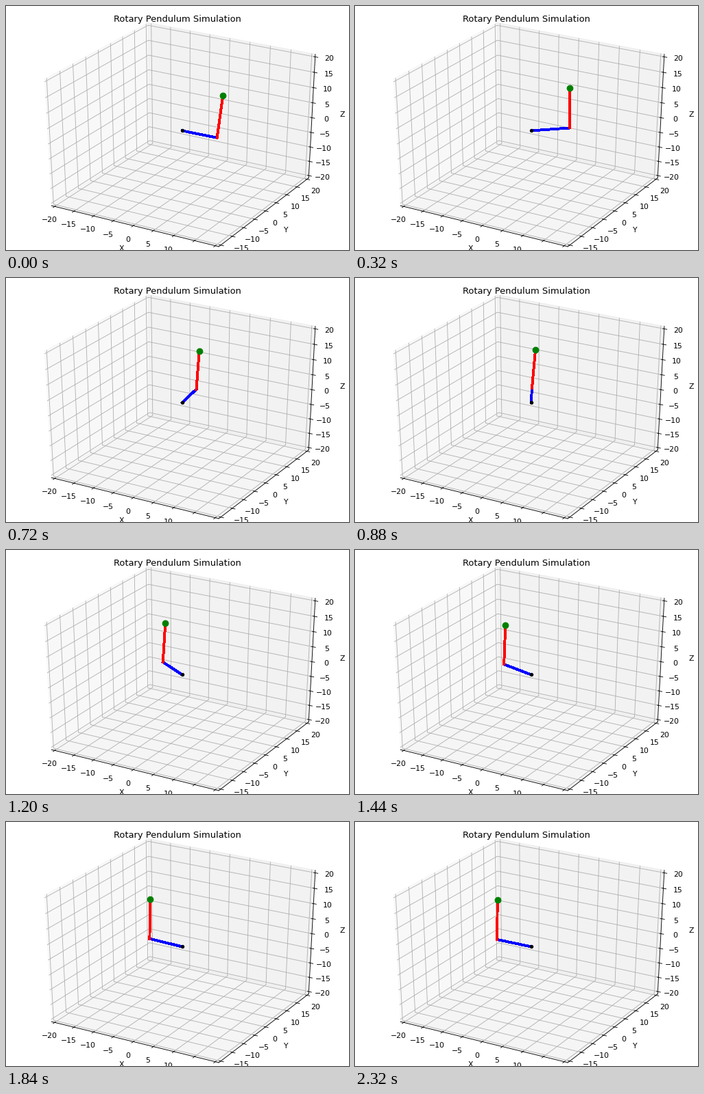
Write a matplotlib script that moves like this. It is 500 px wide and 357 px high and loops after 2440 ms.

```python
import math

import matplotlib.pyplot as plt
import numpy as np
from matplotlib.animation import FuncAnimation

DPI = 78.125
WIDTH, HEIGHT = 500, 357
AXES_HEIGHT = 375          # the axes run past the bottom edge of the stage
FRAMES, INTERVAL = 61, 40
ARM, ROD = 8.5, 12.8
LIMIT = 20


def arm_angle(t):
    """Half turn in degrees that gathers speed, then settles."""
    return 181.5 - 180 * math.exp(-0.52 * t - 0.77 * t * t)


def rod_lean(t):
    """Damped swing of the rod, in radians, about a slight offset."""
    return 0.223 * math.exp(-2 * t) * math.cos(2.6 * t) - 0.033


def pose(t):
    """Positions of the arm tip and the bob."""
    theta, lean = math.radians(arm_angle(t)), rod_lean(t)
    radial = np.array([math.cos(theta), math.sin(theta), 0])
    tangent = np.array([-math.sin(theta), math.cos(theta), 0])
    up = np.array([0, 0, 1])
    tip = ARM * radial
    return tip, tip + ROD * (math.sin(lean) * tangent + math.cos(lean) * up)


def set_points(line, *points):
    line.set_data_3d(*np.array(points).T)


fig = plt.figure(figsize=(WIDTH / DPI, HEIGHT / DPI), dpi=DPI, facecolor="white")
ax = fig.add_axes([0, 1 - AXES_HEIGHT / HEIGHT, 1, AXES_HEIGHT / HEIGHT],
                  projection="3d")
ax.apply_aspect = lambda position=None: None   # fill the rectangle, not a square
ax.set_box_aspect((1, 1, 1), zoom=math.sqrt(3) / 1.8294640721620434)
ax.view_init(elev=30, azim=-60)

edge = LIMIT * 25 / 24
ticks = np.arange(-LIMIT, LIMIT + 1, 5)
ax.set(xlim=(-edge, edge), ylim=(-edge, edge), zlim=(-edge, edge),
       xticks=ticks, yticks=ticks, zticks=ticks,
       xlabel="X", ylabel="Y", zlabel="Z")
ax.set_title("Rotary Pendulum Simulation", y=1)   # a given y stops auto placement
ax.title.set_y(0.92)

arm, = ax.plot([], [], [], color="blue", lw=2.7, zorder=3, antialiased=False)
rod, = ax.plot([], [], [], color="red", lw=2.7, zorder=4, antialiased=False)
ax.plot([0], [0], [0], "o", color="black", ms=4, zorder=5)
bob, = ax.plot([], [], [], "o", color="green", ms=8, zorder=6)


def update(frame):
    tip, top = pose(frame * INTERVAL / 1000)
    set_points(arm, (0, 0, 0), tip)
    set_points(rod, tip, top)
    set_points(bob, top)
    return arm, rod, bob


anim = FuncAnimation(fig, update, frames=FRAMES, interval=INTERVAL,
                     init_func=lambda: update(0), repeat=True, repeat_delay=0)
plt.show()
```
